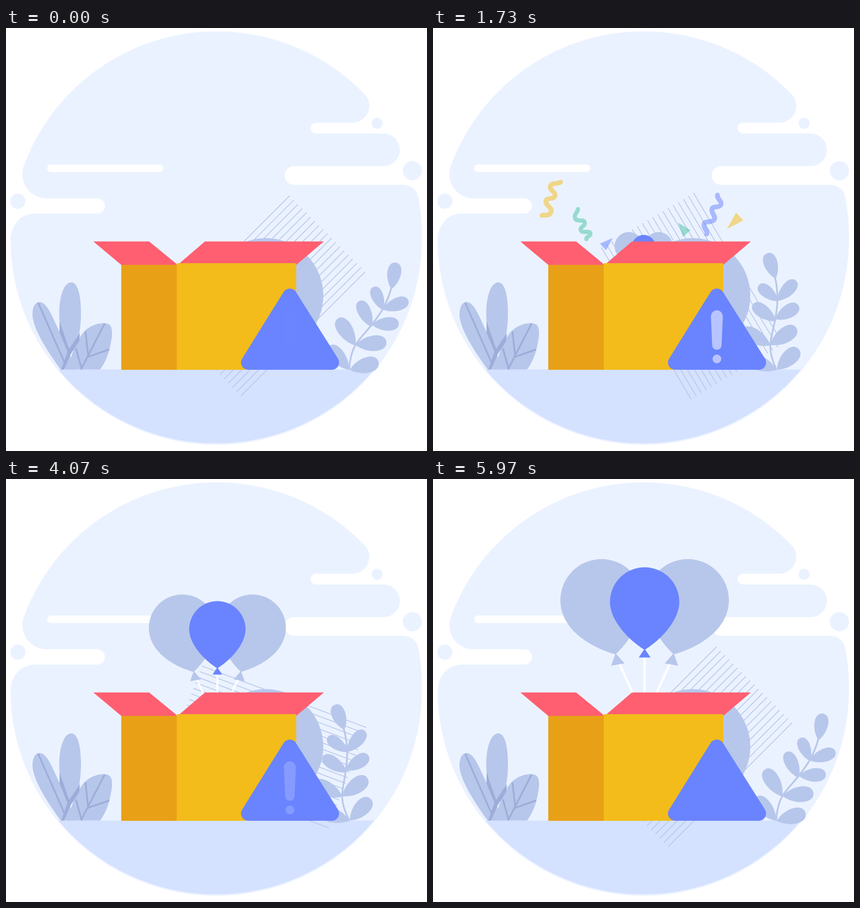
Animation, 747 px wide and 750 px high, one loop 6.01 s. Source, as an HTML page:

```html
<!DOCTYPE html>
<html lang="en">
<head>
<meta charset="utf-8">
<title>Surprise box</title>
<style>
html, body { margin: 0; width: 100%; height: 100%; overflow: hidden; background: #fff; }
svg { display: block; width: 100%; height: 100%; }
.sky { fill: #ebf2ff; }
.pale { fill: #b7c7eb; }
.blue { fill: #6a84ff; }
.yellow { fill: #f3bc1a; }
.teal { fill: #46c5a4; }
.flap { fill: #ff5f70; }
.line { fill: none; stroke-linecap: round; stroke-linejoin: round; }
.vein { fill: none; stroke: #9dadd9; stroke-width: 3; }
</style>
</head>
<body>
<svg viewBox="0 0 747 750">
  <g class="sky">
    <path d="M8 375A42 46 0 0 1 50 329H162A13.5 13.5 0 0 0 162 302H72A43 43 0 0 1 32 243A365 365 0 0 1 637 118A30 30 0 0 1 615 168H550A9.5 9.5 0 0 0 550 187H670A29 29 0 0 1 670 245H511A16.5 16.5 0 0 0 511 278H705A27 27 0 0 1 732 302A365 365 0 0 1 738 373A365 365 0 0 1 8 375Z"/>
    <circle cx="21" cy="307" r="13.5"/>
    <circle cx="658.5" cy="169" r="10"/>
    <circle cx="721" cy="253" r="17"/>
  </g>
  <rect x="73" y="242" width="206" height="13.5" rx="6.7" fill="#fff"/>
  <path fill="#d4e1ff" d="M93 605.5H653A365 365 0 0 1 93 605.5Z"/>

  <!-- left bush -->
  <g class="pale">
    <path d="M97 605.5C74 574 47 532 47 508C47 492 53 485 61 486C74 488 82 512 98 545L112 575L122 605.5Z"/>
    <path d="M111 577C99 551 94 528 94.500 504C95 472 104 451 116 451C128 451 133 476 133 504C133 530 130 549 122 570Z"/>
    <path d="M108 605.500C117 579 126 549 142 535C155 524 174 521 182 525C190 529 189 545 186 559C183 576 177 592 167 605.5Z"/>
  </g>
  <path fill="#9dadd9" d="M95 520L112 569L131 541L130 555L115 578L103 605.5H98L109 574L95 540Z"/>
  <path class="vein" d="M57 487L106 598M175 524L133 605.5M141 538L146 583L183 570M124 568L134 604"/>

  <g id="hatch" stroke="#b7c7eb" stroke-width="1.4"></g>
  <circle class="pale" cx="461" cy="474.500" r="102"/>

  <g id="plant" class="pale">
    <path class="line" stroke="#b7c7eb" stroke-width="3" d="M609 605C610 588 613 574 620 562C628 549 640 538 649 526C657 516 663 508 668 499C675 487 680 475 684 460"/>
  </g>

  <g id="balloons">
    <g id="side">
      <path class="line" stroke="#fff" stroke-width="4" d="M421 326L366 446"/>
      <path class="pale" d="M379 215A73 73 0 0 1 525 215C525 262 480 296 427 311C400 285 379 250 379 215ZM427 309L435 331L411 327Z"/>
    </g>
    <use href="#side" transform="matrix(-1 0 0 1 751 0)"/>
    <path class="line" stroke="#fff" stroke-width="4" d="M375.500 312V450"/>
    <path class="blue" d="M314 218A61.500 61.500 0 0 1 437 218C437 250 405 285 375.500 303C346 285 314 250 314 218ZM375.500 301L386 316.500H365Z"/>
  </g>

  <g id="confetti">
    <g class="line" stroke-width="8.5">
      <path stroke="#f3bc1a" d="M226 273C222 277 211 273 208 280S219 291 216 298S201 299 200 307S212 317 209 326S197 330 193 332"/>
      <path stroke="#46c5a4" stroke-width="7.5" d="M257 321C256 329 249 329 252 337S268 337 269 345S260 351 262 358S278 358 279 364S272 368 272 374"/>
      <path stroke="#6a84ff" d="M505 296C504 304 514 306 511 313S495 314 495 322S503 334 499 340S482 340 481 348S488 358 486 365"/>
    </g>
    <path class="yellow" d="M538 327L551 341L522 356Z"/>
    <path class="teal" d="M435 345L457 358L444 370Z"/>
    <path class="blue" d="M319 372L296 382L307 394Z"/>
  </g>

  <!-- box -->
  <path fill="#e8a016" d="M204.500 419H304V606H204.500Z"/>
  <path class="yellow" d="M303 417H515V606H303Z"/>
  <path class="flap" d="M155 378.500H254L301 417L303 420H204.500ZM353 378.500H564L515 420V417H308Z"/>

  <!-- warning sign -->
  <path class="blue" stroke="#6a84ff" stroke-width="26" stroke-linejoin="round" d="M430 593H578L503.500 475Z"/>
  <g id="mark" fill="#fff">
    <path d="M493 510.500A10.700 11 0 0 1 514.300 510.500L512 562.500A8.300 8 0 0 1 495.400 562.500Z"/>
    <circle cx="503.700" cy="586.700" r="7.700"/>
  </g>
</svg>
<script>
const LOOP = 6010, SPAN = 5970, FRAMES = 179;
const el = id => document.getElementById(id);
const set = (id, name, value) => el(id).setAttribute(name, value);

function add(id, d, transform) {
  const path = document.createElementNS('http://www.w3.org/2000/svg', 'path');
  path.setAttribute('d', d);
  if (transform) path.setAttribute('transform', transform);
  el(id).append(path);
}

for (let i = 0; i < 19; i++) add('hatch', `M-156 ${(i - 9) * 10.55}h312`);

// each leaf: base x, base y, tip x, tip y, relative width
[
  [610, 606, 661, 592, 1], [620, 562, 675, 557, .96], [649, 526, 697, 524, .96],
  [668, 499, 714, 483, .92], [684, 463, 692, 416, .98],
  [669, 500, 652, 459, .92], [649, 530, 627, 484, .88], [620, 563, 589, 515, .9],
  [609, 606, 573, 564, .9]
].forEach(([x, y, tx, ty, w]) => {
  const dx = tx - x, dy = ty - y;
  add('plant', 'M0 0C.35-.34 1-.36 1 0S.35 .34 0 0Z',
    `matrix(${dx} ${dy} ${-dy * w} ${dx * w} ${x} ${y})`);
});

const scaleAt = (x, y, s) => `translate(${x} ${y}) scale(${s}) translate(${-x} ${-y})`;
const triangle = p => 1 - Math.abs(2 * (p % 1) - 1);

function draw(now) {
  const t = now % LOOP, p = Math.min(1, t / SPAN);
  set('hatch', 'transform', `translate(460 475) rotate(${360 * p - 45})`);
  set('plant', 'transform', `rotate(${-48.5 * triangle(p)} 609 605)`);
  set('balloons', 'transform', scaleAt(373, 478, Math.min(1, t / 5005)));
  set('mark', 'opacity', triangle(6 * p));

  // three bursts, each growing out of the box
  const f = p * FRAMES;
  const age = f - (f < 62 ? 0 : f < 121 ? 62 : 121);
  const alpha = age < 31 ? (age - 10) / 21 : 1 - (age - 31) * .0235;
  set('confetti', 'transform', scaleAt(368, 449, age / 52));
  set('confetti', 'opacity', age > 57.5 ? 0 : Math.max(0, alpha));
}

function tick() {
  draw(performance.now());
  requestAnimationFrame(tick);
}
tick();
</script>
</body>
</html>
```
